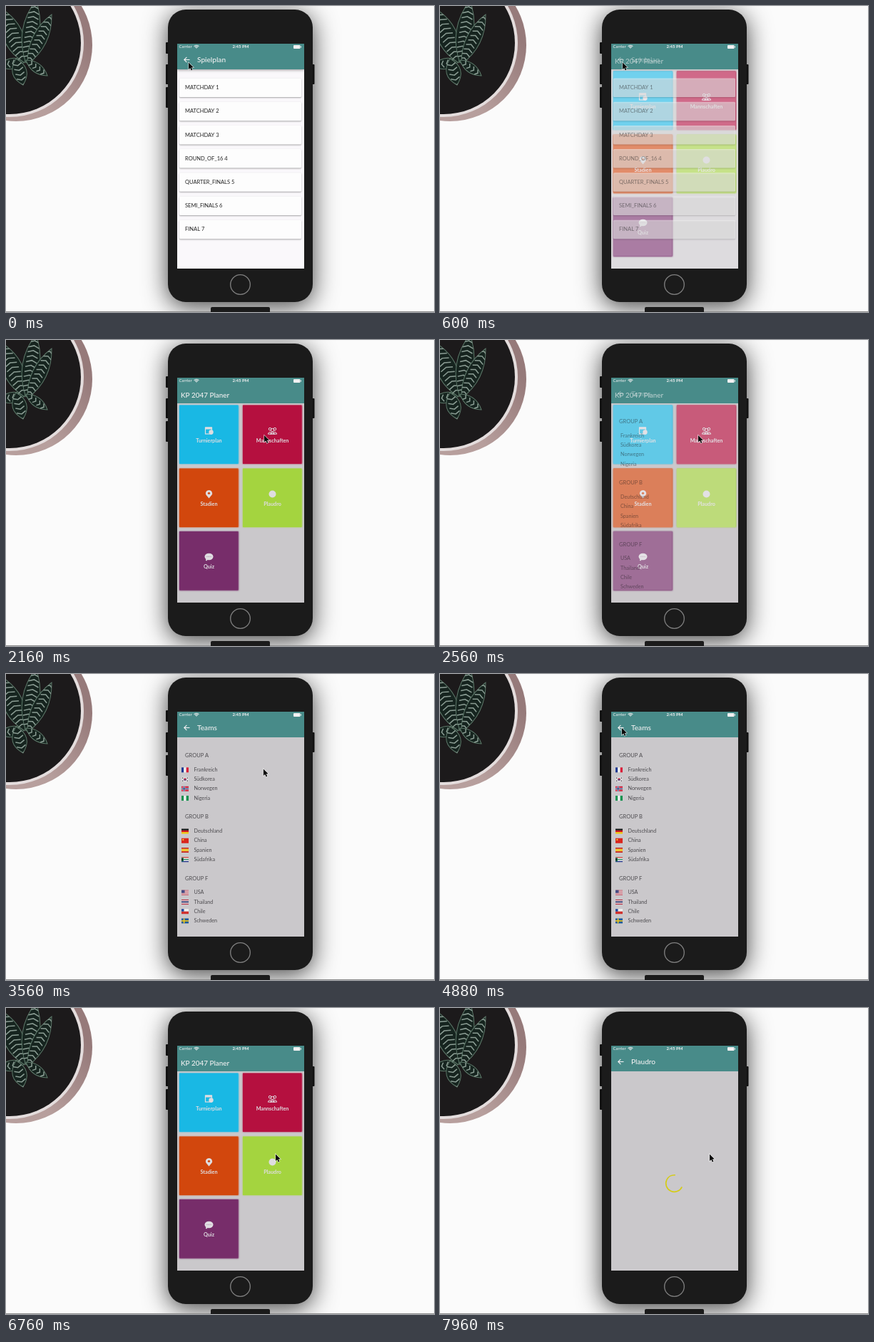
These frames come from a looping animation (600x430 px, 8000 ms). An HTML page with a canvas:

```html
<!DOCTYPE html>
<html lang="de">
<head>
<meta charset="utf-8">
<title>Planer</title>
<style>
html, body { margin: 0; width: 100%; height: 100%; overflow: hidden; background: #fafafa; }
canvas { display: block; width: 600px; height: 430px; }
</style>
</head>
<body>
<canvas id="stage" width="600" height="430"></canvas>
<script>
const LOOP = 8000;
const FONT = 'Lato, "Open Sans", sans-serif';
const GRAY = 202, LIGHT = 250;
const INK = '#dfdde1', BAR_INK = '#f2f1f2';
const stage = document.getElementById('stage').getContext('2d');
let c = stage;

const clamp = v => Math.min(1, Math.max(0, v));
const mix = (a, b, p) => a + (b - a) * p;
const ease = p => p * p * (3 - 2 * p);
const ramp = (t, from, to) => clamp((t - from) / (to - from));
const tone = v => `rgb(${v},${v - 2},${v + 1})`;

function rect(x, y, w, h, fill) {
  c.fillStyle = fill;
  c.fillRect(x, y, w, h);
}

function round(x, y, w, h, r, fill) {
  c.beginPath();
  c.roundRect(x, y, w, h, r);
  c.fillStyle = fill;
  c.fill();
}

function disc(x, y, r, fill) {
  c.beginPath();
  c.arc(x, y, r, 0, 7);
  c.fillStyle = fill;
  c.fill();
}

function line(points, color, width) {
  c.beginPath();
  points.forEach(([x, y]) => c.lineTo(x, y));
  c.strokeStyle = color;
  c.lineWidth = width;
  c.stroke();
}

function text(str, x, y, size, color, weight = 400, align = 'left') {
  c.font = `${weight} ${size}px ${FONT}`;
  c.textAlign = align;
  c.textBaseline = 'middle';
  c.fillStyle = color;
  c.fillText(str, x, y);
}

function faded(alpha, draw) {
  if (alpha <= 0) return;
  c.save();
  c.globalAlpha *= alpha;
  draw();
  c.restore();
}

function shadow(color, blur, dy) {
  c.shadowColor = color;
  c.shadowBlur = blur;
  c.shadowOffsetY = dy;
}

// Desk, plant and phone body

function leaf(x, y, tipX, tipY, width) {
  const len = Math.hypot(tipX - x, tipY - y);
  c.save();
  c.translate(x, y);
  c.rotate(Math.atan2(tipY - y, tipX - x));
  c.beginPath();
  c.moveTo(0, 0);
  c.quadraticCurveTo(len * .5, -width, len, 0);
  c.quadraticCurveTo(len * .5, width, 0, 0);
  c.fillStyle = '#16241f';
  c.fill();
  c.strokeStyle = '#5d7869';
  c.lineWidth = 1;
  c.stroke();
  c.clip();
  for (let d = 10; d < len; d += 7) {
    line([[d - 3, -width * .32], [d, 0], [d - 3, width * .32]], '#8b9d94', 1.5);
  }
  c.restore();
}

function drawPlant() {
  const pot = c.createLinearGradient(40, 120, 122, 60);
  pot.addColorStop(0, '#b79f9d');
  pot.addColorStop(1, '#967a7a');
  disc(14, 55, 107, pot);
  disc(5, 52, 104, '#e4dddd');
  disc(5, 52, 100, '#1c1a1b');
  leaf(26, 78, -10, 84, 15);
  leaf(26, 80, -6, 4, 28);
  leaf(28, 80, 42, -8, 24);
  leaf(30, 82, 64, 12, 20);
  leaf(14, 74, 24, 111, 20);
  leaf(28, 76, 58, 98, 13);
}

function drawScene() {
  rect(0, 0, 600, 430, '#fbfbfb');
  drawPlant();
  const body = '#1b1b1b';
  [[224, 51, 16], [224, 82, 28], [224, 114, 29], [428, 82, 28]]
    .forEach(([x, y, h]) => round(x, y, 4.5, h, 1, body));
  c.save();
  shadow('rgba(0,0,0,.75)', 34, 6);
  round(227, 5, 203, 411, 25, body);
  c.restore();
  c.beginPath();
  c.arc(328.5, 391.5, 13.8, 0, 7);
  c.strokeStyle = '#808080';
  c.lineWidth = 1.3;
  c.stroke();
  rect(0, 429, 600, 1, '#8e8e8e');
  round(287, 423, 83, 10, 2, body);
}

// Home screen

const tiles = [
  ['Turnierplan', '#19b8e4', 243, 91.5, calendar],
  ['Mannschaften', '#b5103f', 332, 91.5, people],
  ['Stadien', '#d2470d', 243, 180.5, pin],
  ['Plaudro', '#a4d43f', 332, 180.5, dot],
  ['Quiz', '#772d6a', 243, 269, bubble]
];
const TILE = 82.5;

function calendar() {
  c.strokeStyle = INK;
  c.lineWidth = 1.2;
  c.strokeRect(-5, -4.5, 9, 9);
  rect(-5, -5, 9, 3, INK);
  disc(3, 2, 3.2, INK);
}

function people() {
  c.strokeStyle = INK;
  c.lineWidth = 1;
  [[-3.4, -2.4, 1.8], [3.4, -2.4, 1.8], [0, -1, 2.2]].forEach(([x, y, r]) => {
    c.beginPath();
    c.arc(x, y, r, 0, 7);
    c.moveTo(x - r - 1, 4.6);
    c.quadraticCurveTo(x - r, r, x, r);
    c.quadraticCurveTo(x + r, r, x + r + 1, 4.6);
    c.closePath();
    c.stroke();
  });
}

function pin() {
  c.beginPath();
  c.arc(0, -1, 4.6, Math.PI * .85, Math.PI * 2.15);
  c.lineTo(0, 6);
  c.fillStyle = INK;
  c.fill();
  disc(0, -1.2, 1.6, '#d2470d');
}

function dot() {
  disc(0, 0, 5, INK);
}

function bubble() {
  c.beginPath();
  c.ellipse(0, -.5, 6, 4.8, 0, 0, 7);
  c.fillStyle = INK;
  c.fill();
  line([[-2, 2], [-4, 5]], INK, 2);
  [-2.5, 0, 2.5].forEach(x => disc(x, -.5, .6, '#9d7094'));
}

function drawTile([label, color, x, y, icon]) {
  c.save();
  shadow(color, 2, 0);
  rect(x, y, TILE, TILE, color);
  c.restore();
  c.save();
  c.translate(x + 41.5, y + 36);
  icon();
  c.restore();
  text(label, x + 41.5, y + 50, 7.2, INK, 700, 'center');
}

// Inner pages

const rounds = ['MATCHDAY 1', 'MATCHDAY 2', 'MATCHDAY 3', 'ROUND_OF_16 4',
  'QUARTER_FINALS 5', 'SEMI_FINALS 6', 'FINAL 7'];

function planPage() {
  rounds.forEach((name, i) => {
    const y = 101.5 + i * 33.2;
    c.save();
    shadow('rgba(0,0,0,.35)', 2, 1);
    round(243, y, 171, 26.5, 1.5, '#fdfdfd');
    c.restore();
    text(name, 251, y + 13.5, 7.5, '#222');
  });
}

const bars = (colors, upright) => () => colors.forEach((col, i) => {
  const n = colors.length;
  if (upright) rect(i * 10 / n, 0, 10 / n, 7, col);
  else rect(0, i * 7 / n, 10, 7 / n, col);
});

const layers = (...parts) => () => parts.forEach(p => p());
const box = (...args) => () => rect(...args);
const spot = (...args) => () => disc(...args);
const cross = (base, arm, w) => layers(box(0, 0, 10, 7, base),
  box(3.6 - w / 2, 0, w, 7, arm), box(0, 3.5 - w / 2, 10, w, arm));

const groups = [
  ['GROUP A', [
    ['Frankreich', bars(['#1f3a93', '#f2f2f2', '#d8213b'], true)],
    ['Südkorea', layers(box(0, 0, 10, 7, '#dcdadd'), spot(5, 3.5, 1.8, '#c72b42'),
      box(3.5, 3.6, 3, 1.2, '#25408f'), box(1, 1, 1.2, 1.2, '#333'), box(7.8, 1, 1.2, 1.2, '#333'),
      box(1, 5, 1.2, 1.2, '#333'), box(7.8, 5, 1.2, 1.2, '#333'))],
    ['Norwegen', layers(cross('#cf2440', '#eee', 2.4), box(3, 0, 1.2, 7, '#24407f'),
      box(0, 2.9, 10, 1.2, '#24407f'))],
    ['Nigeria', bars(['#12924f', '#f0f0f0', '#12924f'], true)]
  ]],
  ['GROUP B', [
    ['Deutschland', bars(['#151515', '#d3171d', '#f2c70c'])],
    ['China', layers(box(0, 0, 10, 7, '#d9251d'), spot(2.3, 2.2, 1.1, '#f3d02f'))],
    ['Spanien', bars(['#c8201f', '#f4c51e', '#f4c51e', '#c8201f'])],
    ['Südafrika', layers(bars(['#d23a30', '#eee', '#168457', '#eee', '#24368d']),
      box(0, 1, 3, 5, '#168457'), box(0, 2, 2, 3, '#222'))]
  ]],
  ['GROUP F', [
    ['USA', layers(bars(['#c43c50', '#eee', '#c43c50', '#eee', '#c43c50', '#eee', '#c43c50']),
      box(0, 0, 4.5, 4, '#454b83'))],
    ['Thailand', bars(['#b8283b', '#eee', '#2e2f6b', '#2e2f6b', '#eee', '#b8283b'])],
    ['Chile', layers(bars(['#f0f0f0', '#d0312d']), box(0, 0, 3.5, 3.5, '#1d4598'))],
    ['Schweden', cross('#17599c', '#f3c81b', 1.6)]
  ]]
];

function teamsPage(t) {
  const loaded = t > 2900;
  const ink = loaded ? '#4d4b4f' : '#1c1a1c';
  groups.forEach(([title, teams], g) => {
    const top = 115 + g * 86.2;
    text(title, 251, top, 7.5, ink);
    teams.forEach(([name, flag], i) => {
      const y = top + 19.8 + i * 13.25;
      text(name, loaded ? 263.5 : 253, y, 7.2, ink);
      if (!loaded) return;
      c.save();
      c.translate(246, y - 3.5);
      flag();
      c.restore();
    });
  });
}

function feedPage(t) {
  const phase = (t - 7960) / 1000;
  const start = .42 + phase * 7;
  const sweep = 4.4 - 1.8 * Math.sin(phase * 4) ** 2;
  c.beginPath();
  c.arc(328.5, 246.5, 11.8, start, start + sweep);
  c.strokeStyle = '#d5cc16';
  c.lineWidth = 1.6;
  c.stroke();
}

const pages = {
  plan: { title: 'Spielplan', bg: LIGHT, lift: .4, draw: planPage },
  teams: { title: 'Teams', bg: GRAY, lift: 0, draw: teamsPage },
  feed: { title: 'Plaudro', bg: GRAY, lift: 0, draw: feedPage }
};

// Which page lies over the home screen, and how opaque it is
function pageAt(t) {
  if (t < 1000) return [pages.plan, 1 - ease(ramp(t, 400, 750))];
  if (t < 6000) return [pages.teams, ease(ramp(t, 2425, 2770)) * (1 - ease(ramp(t, 5460, 5820)))];
  return [pages.feed, ease(ramp(t, 7120, 7460))];
}

function drawStatus() {
  text('Carrier', 242.5, 57.5, 6, BAR_INK);
  text('2:45 PM', 329, 57.5, 6, BAR_INK, 700, 'center');
  c.strokeStyle = BAR_INK;
  c.lineWidth = 1.1;
  [1.2, 3, 4.8].forEach(r => {
    c.beginPath();
    c.arc(267, 60, r, -Math.PI * .75, -Math.PI * .25);
    c.stroke();
  });
  round(403, 55, 9.5, 5, 1, BAR_INK);
  rect(413, 56.5, 1, 2, BAR_INK);
}

function drawHeader(page, p) {
  c.save();
  shadow(`rgba(0,0,0,${page.lift * p})`, 4, 1);
  rect(240, 53, 178, 36, '#488b89');
  c.restore();
  drawStatus();
  faded(1 - p, () => text('KP 2047 Planer', 245, 78, 9.9, BAR_INK, 500));
  faded(p, () => {
    line([[257.5, 75.5], [249.8, 75.5]], BAR_INK, 1.1);
    line([[253.4, 71.8], [249.8, 75.5], [253.4, 79.2]], BAR_INK, 1.1);
    text(page.title, 268, 76, 10.1, BAR_INK, 500);
  });
}

function drawScreen(t) {
  const [page, p] = pageAt(t);
  c.save();
  c.beginPath();
  c.rect(240, 53, 178, 316);
  c.clip();
  rect(240, 53, 178, 316, tone(GRAY));
  faded(p, () => rect(240, 53, 178, 316, tone(page.bg)));
  if (p < 1) {
    faded(1 - ramp(p, .8, 1), () => tiles.forEach(drawTile));
    const veil = tone(Math.round(mix(LIGHT, page.bg, p)));
    faded(p, () => tiles.forEach(([, , x, y]) => rect(x, y, TILE, TILE, veil)));
  }
  faded(p ** .7, () => page.draw(t));
  drawHeader(page, p);
  c.restore();
}

// Pointer: time, x, y
const path = [
  [0, 256, 79.5], [950, 256, 79.5], [1240, 278, 87], [1900, 362, 134], [3500, 362, 134],
  [4500, 255, 76], [5600, 255, 76], [5760, 265, 80], [6500, 378, 205.5], [LOOP, 378, 205.5]
];

function drawPointer(t) {
  const i = path.findIndex(k => k[0] > t);
  const [t0, x0, y0] = path[i - 1], [t1, x1, y1] = path[i];
  const p = ease(ramp(t, t0, t1));
  c.save();
  c.translate(mix(x0, x1, p), mix(y0, y1, p));
  c.beginPath();
  [[0, 0], [0, 9.6], [2.2, 7.6], [3.8, 11], [5.4, 10.3], [3.9, 7], [6.8, 6.8]]
    .forEach(([x, y]) => c.lineTo(x, y));
  c.closePath();
  c.strokeStyle = 'rgba(255,255,255,.8)';
  c.lineWidth = 1.2;
  c.stroke();
  c.fillStyle = '#0b0b0b';
  c.fill();
  c.restore();
}

const scene = document.createElement('canvas');
scene.width = 600;
scene.height = 430;
c = scene.getContext('2d');
drawScene();
c = stage;

const begin = performance.now();
function frame() {
  const t = (performance.now() - begin) % LOOP;
  c.drawImage(scene, 0, 0);
  drawScreen(t);
  drawPointer(t);
  requestAnimationFrame(frame);
}
frame();
</script>
</body>
</html>
```
